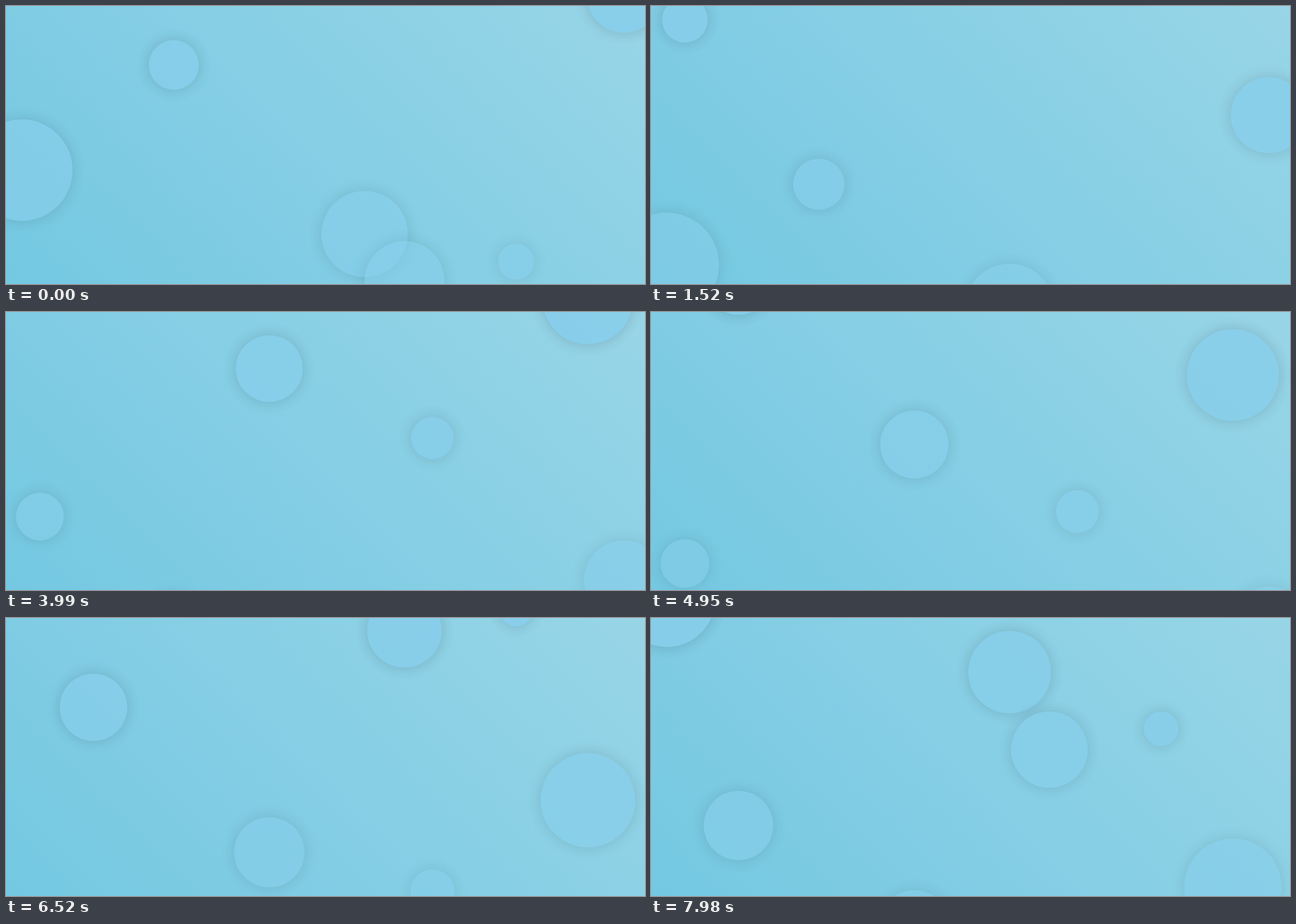
An HTML page for the animation above (8000 ms loop, 818x357 px).

```html
<!DOCTYPE html>
<html lang="en">
<head>
<meta charset="utf-8">
<title>Falling bubbles</title>
<style>
  html, body { margin: 0; width: 100%; height: 100%; overflow: hidden; }
  body { position: relative; background: linear-gradient(45deg, #74c8e2, #98d5e7); }
  .bubble {
    position: absolute;
    left: 0;
    top: 0;
    border-radius: 50%;
    background: #87ceeb;
    box-shadow: 0 0 20px rgba(0, 0, 0, .2);
  }
</style>
</head>
<body>
<script>
const LOOP = 8000;
const STEP = 68.8;      // time between pictures, ms
const PERIOD = 10312;   // time between two falls of one bubble, ms
const FAST = 0.1012;    // px per ms above the slowing point
const SLOW = 0.0627;    // px per ms below it

// x: centre; r and time: radius and moment at which the fall slows down
const bubbles = [
  { x: 20, r: 66, time: 692 },
  { x: 215, r: 33.2, time: 1775 },
  { x: 791, r: 50, time: 2782 },
  { x: 43.5, r: 30.6, time: 3843 },
  { x: 546, r: 27.7, time: 4873 },
  { x: 337, r: 44.4, time: 5884 },
  { x: 745, r: 61.1, time: 6890 },
  { x: 112, r: 44.5, time: 7945 },
  { x: 459.3, r: 55.2, time: 9984 },
  { x: 510, r: 50, time: 8964 },
  { x: 653, r: 22.6, time: 9019 }
];

for (const bubble of bubbles) {
  const element = document.createElement('div');
  element.className = 'bubble';
  element.style.width = element.style.height = 2 * bubble.r + 'px';
  document.body.append(element);
  bubble.style = element.style;
}

function place({ x, r, time, style }, now) {
  let age = now - time;
  age -= PERIOD * Math.round(age / PERIOD);
  const y = 230 + 0.77 * r + age * (age < 0 ? FAST : SLOW);
  const scale = 1 + age * 0.000018;
  style.transform = `translate(${x - r}px, ${y - r}px) scale(${scale})`;
  style.opacity = Math.min(0.85, Math.max(0, 0.62 - age * 0.00008));
}

function draw() {
  const elapsed = performance.now() % LOOP;
  const now = Math.floor((elapsed + 8) / STEP) * STEP;
  for (const bubble of bubbles) place(bubble, now);
  requestAnimationFrame(draw);
}
draw();
</script>
</body>
</html>
```
